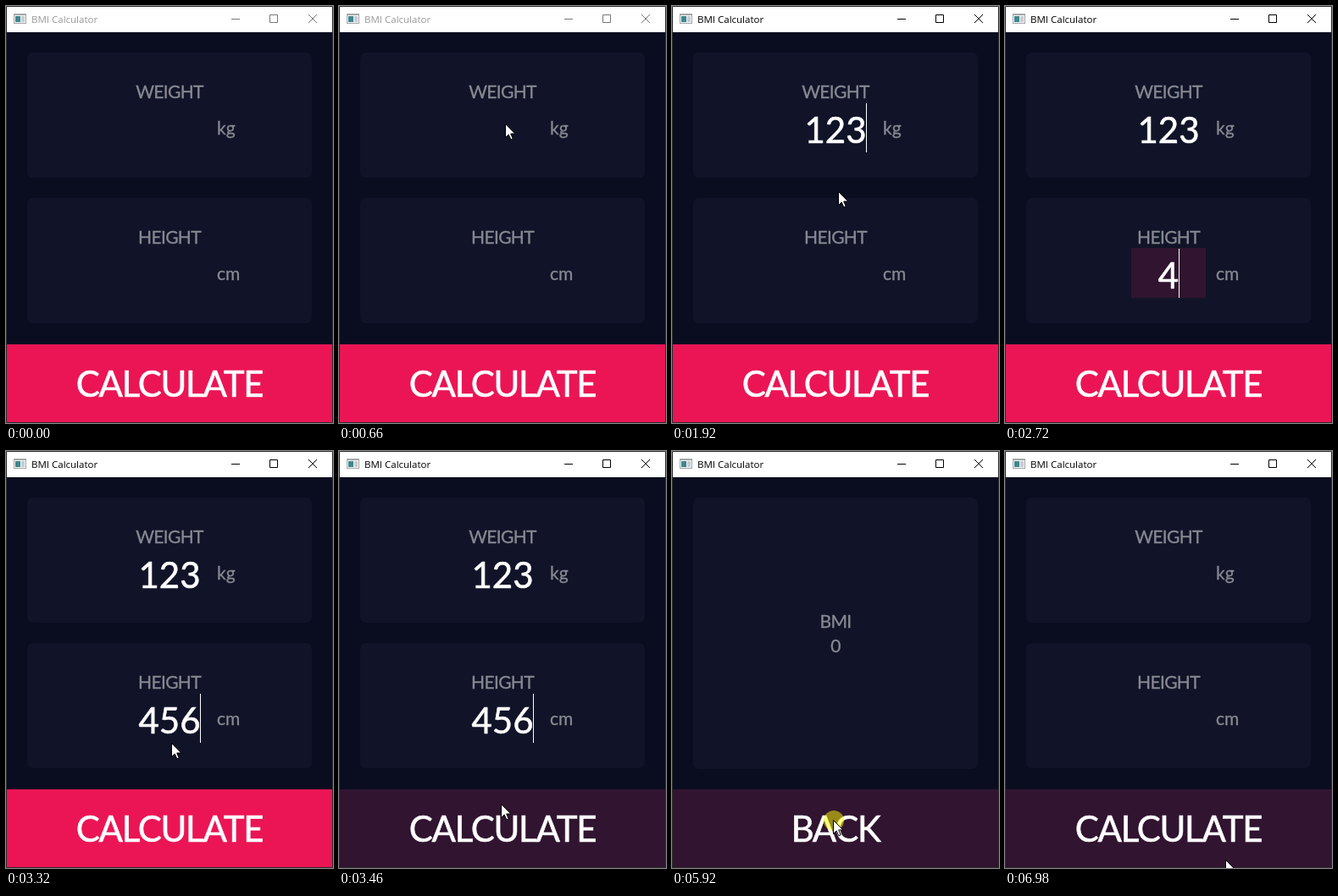
These frames come from a looping animation (386x493 px, 7.04 s). An HTML page with a canvas:

```html
<!DOCTYPE html>
<html lang="en">
<head>
<meta charset="utf-8">
<title>BMI Calculator</title>
<style>
html, body { margin: 0; width: 100%; height: 100%; overflow: hidden; background: #0a0d20; }
canvas { display: block; }
</style>
</head>
<body>
<canvas id="stage" width="386" height="493"></canvas>
<script>
const ctx = document.getElementById('stage').getContext('2d');
const W = 386, H = 493, MID = W / 2;
const LOOP = 7040, STEP = 66, KEY_GAP = 200, BLINK = 530, CLICK = 270;
const BACKGROUND = '#0a0d20', CARD = '#111428', PINK = '#eb1555', HOVER = '#311430', GREY = '#888993';
const LABEL = 21, LARGE = 42, DIGIT = 0.58 * LARGE;

// The story: click a field, type three digits, press the button, press it again
const ACTIVATE = 800, SHOW_RESULT = 4650, SHOW_INPUT = 6780;
const weight = { label: 'WEIGHT', unit: 'kg', digits: '123', top: 55, click: ACTIVATE, typeAt: 1330, leaveAt: 1790 };
const height = { label: 'HEIGHT', unit: 'cm', digits: '456', top: 227, click: 2190, typeAt: 2720, leaveAt: 3190 };
const fields = [weight, height];
const PRESS = 3920, PRESS_BACK = 5850;

const point = (x, y) => ({ x, y });
const between = (t, from, to) => t >= from && t < to;
const inputTop = field => field.top + 60;

function glide(from, to, t, start, steps) {
  const k = Math.min(Math.max(Math.floor((t - start) / STEP) / steps, 0), 1);
  const e = 1 - (1 - k) ** 1.5;
  return point(Math.round(from.x + (to.x - from.x) * e), Math.round(from.y + (to.y - from.y) * e));
}

function pointerAt(t) {
  let p = point(362, 484);
  p = glide(p, point(197, 140), t, 70, 5);
  p = glide(p, point(197, 315), t, weight.leaveAt, 3);
  p = glide(p, point(191, 443), t, height.leaveAt, 6);
  p = glide(p, point(191, 437), t, PRESS_BACK, 1);
  return glide(p, point(261, 484), t, SHOW_INPUT, 3);
}

function clicking(t) {
  return [weight.click, height.click, PRESS].some(at => between(t, at, at + CLICK))
    || between(t, PRESS_BACK, SHOW_INPUT);
}

function rect(x, y, w, h, color) {
  ctx.fillStyle = color;
  ctx.fillRect(x, y, w, h);
}

function text(str, x, y, size, color, { align = 'center', family = 'Lato', tracking = 0, weight = 0.015 } = {}) {
  ctx.font = `${size}px "${family}", sans-serif`;
  ctx.letterSpacing = `${tracking * size}px`;
  ctx.textAlign = align;
  ctx.fillStyle = ctx.strokeStyle = color;
  ctx.fillText(str, x, y);
  ctx.lineWidth = weight * size;
  if (weight) ctx.strokeText(str, x, y);
}

const capitals = (str, y, size, color) => text(str, MID, y, size, color, { tracking: -0.03 });

function outline(path, color) {
  ctx.strokeStyle = color;
  ctx.lineWidth = 1;
  ctx.stroke(new Path2D(path));
}

function card(y, h) {
  ctx.fillStyle = CARD;
  ctx.beginPath();
  ctx.roundRect(25, y, 336, h, 7);
  ctx.fill();
}

function titleBar(active) {
  rect(0, 0, W, 31, '#fff');
  rect(9, 9, 15, 12, '#a3a7aa');
  rect(10, 11, 13, 9, '#f2f4f5');
  rect(11, 12, 6, 7, '#3f8790');
  rect(18, 12, 4, 7, '#c9cdd0');
  text('BMI Calculator', 30, 20, 11.5, active ? '#000' : '#999',
    { align: 'left', family: 'Open Sans', weight: 0 });
  outline('M266 15.5h10 M311.5 10.5h9v9h-9z M357 10l10 10 M367 10l-10 10', active ? '#000' : '#777');
}

function inputCard(field, t, hovered) {
  const { top } = field, baseline = inputTop(field) + 46.5;
  card(top, 148);
  if (hovered) rect(149, inputTop(field) - 1, 88, 59, HOVER);
  capitals(field.label, top + 53.5, LABEL, GREY);
  text(field.unit, 249, top + 97, LABEL, GREY, { align: 'left' });
  if (t >= SHOW_RESULT) return;

  const typed = Math.max(0, Math.floor((t - field.typeAt) / KEY_GAP) + 1);
  const value = field.digits.slice(0, typed);
  text(value, MID, baseline, LARGE, '#fff');

  const focused = between(t, field.click, field === weight ? height.click : SHOW_RESULT);
  const idle = Math.max(0, t - field.typeAt - 340);
  if (focused && Math.floor(idle / BLINK) % 2 === 0)
    rect(Math.floor(MID + DIGIT / 2 * value.length), inputTop(field), 1, 58, '#fff');
}

function resultCard() {
  card(55, 321);
  capitals('BMI', 209, LABEL, GREY);
  capitals('0', 238, LABEL, GREY);
}

function button(label, hovered) {
  rect(0, 400, W, H - 400, hovered ? HOVER : PINK);
  capitals(label, 462, LARGE, '#fff');
}

function drawPointer({ x, y }, overField) {
  ctx.save();
  ctx.translate(x, y);
  if (overField) {
    outline('M.5 -8v16 M-3 -7.5h7 M-3 7.5h7', '#fff');
  } else {
    const arrow = new Path2D('M0 0V16L3.7 12.5L6.3 18.3L8.7 17.3L6.2 11.5H11.3Z');
    ctx.translate(-0.5, -0.5);
    ctx.fillStyle = '#fff';
    ctx.fill(arrow);
    outline(arrow, '#000');
  }
  ctx.restore();
}

function draw(t) {
  const active = t >= ACTIVATE;
  const result = between(t, SHOW_RESULT, SHOW_INPUT);
  const p = pointerAt(t);
  const hoveredField = active && !result && fields.find(f =>
    between(p.x, 149, 237) && between(p.y, inputTop(f), inputTop(f) + 59));

  rect(0, 0, W, H, BACKGROUND);
  titleBar(active);
  if (result) resultCard();
  else fields.forEach(f => inputCard(f, t, f === hoveredField));
  button(result ? 'BACK' : 'CALCULATE', active && p.y >= 400);
  outline(`M.5 .5H${W - 0.5}V${H - 0.5}H.5Z`, '#2b2b2e');

  if (clicking(t)) {
    ctx.fillStyle = 'rgba(255, 255, 0, 0.5)';
    ctx.beginPath();
    ctx.arc(p.x, p.y, 12, 0, Math.PI * 2);
    ctx.fill();
  }
  const typing = fields.some(f => between(t, f.typeAt, f.leaveAt));
  if (t >= 70 && !typing) drawPointer(p, hoveredField);
}

function tick() {
  draw(performance.now() % LOOP);
  requestAnimationFrame(tick);
}
tick();
</script>
</body>
</html>
```
